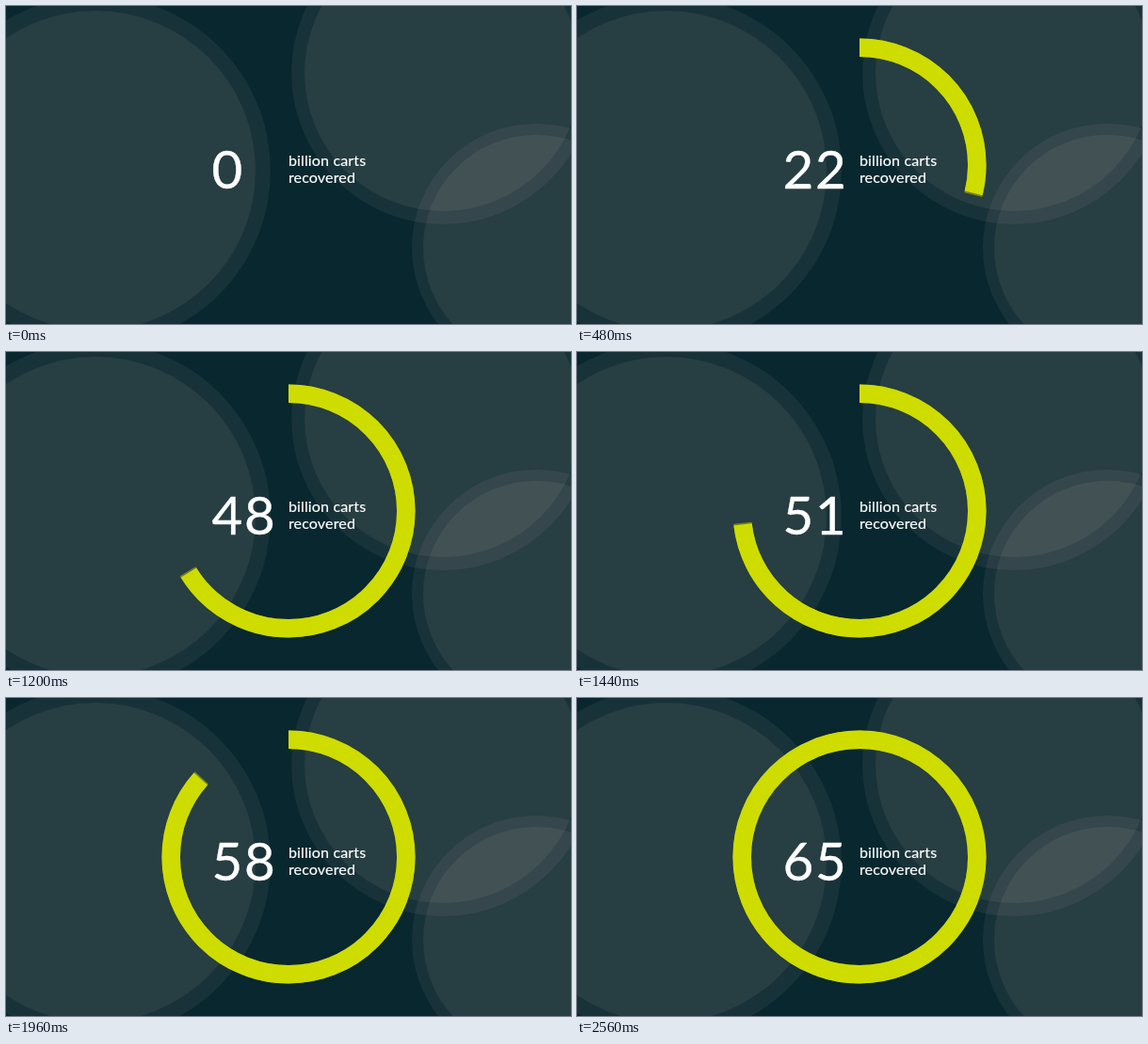
Animation, 600 px wide and 338 px high, one loop 5 s. Source, as an HTML page:

```html
<!DOCTYPE html>
<html lang="en">
<head>
<meta charset="utf-8">
<title>Carts recovered</title>
<style>
  html, body { margin: 0; width: 100%; height: 100%; overflow: hidden; background: #08272e; }
  svg { display: block; width: 100vw; height: 100vh; }
  text { font-family: Lato, "Open Sans", sans-serif; fill: #fff; stroke: #fff; stroke-linejoin: round; }
  .count { font-size: 56.5px; letter-spacing: 1.6px; stroke-width: .4; }
  .label { font-size: 16.1px; letter-spacing: .12px; stroke-width: .2; }
  .disc { fill: #ffdac3; fill-opacity: .065; }
  .halo { fill: #ffcddc; fill-opacity: .062; }
  .arc { fill: none; stroke-width: 19.5; }
</style>
</head>
<body>
<svg viewBox="0 0 600 338" preserveAspectRatio="none">
  <rect width="600" height="338" fill="#08272e"/>
  <g id="discs"></g>
  <g transform="rotate(-90 300 169)">
    <circle id="tip" class="arc" cx="300" cy="169" r="124.8" stroke="#78851b"/>
    <circle id="bar" class="arc" cx="300" cy="169" r="124.8" stroke="#cedc00"/>
  </g>
  <text id="count" class="count" x="218.6" y="193.6">0</text>
  <text class="label" x="299.9" y="169.5">billion carts</text>
  <text class="label" x="299.9" y="187.5">recovered</text>
</svg>
<script>
  const LOOP = 5000, STEP = 40, END = 2560, TIP = 0.8;
  const TURN = 2 * Math.PI * 124.8;

  // [time in ms, value], joined by straight lines
  const ANGLE = [[0, 0], [1000, 218], [1700, 291.2], [END, 361]];
  const COUNT = [[0, 0], [1000, 45], [END, 65]];

  // Background discs: centre, inner radius, outer radius
  const DISCS = [[95, 175, 170, 186], [464, 71, 147, 161], [563, 257, 120, 132]];

  const $ = id => document.getElementById(id);

  $("discs").innerHTML = DISCS.map(([x, y, inner, outer]) =>
    `<circle class="halo" cx="${x}" cy="${y}" r="${outer}"/>` +
    `<circle class="disc" cx="${x}" cy="${y}" r="${inner}"/>`).join("");

  function valueAt(keys, t) {
    const i = Math.max(1, keys.findIndex(k => k[0] >= t));
    const [t0, a] = keys[i - 1], [t1, b] = keys[i];
    return a + (b - a) * (t - t0) / (t1 - t0);
  }

  function setArc(el, degrees) {
    el.style.display = degrees > 0 ? "" : "none";
    el.setAttribute("stroke-dasharray",
      degrees >= 360 ? "none" : `${TURN * degrees / 360} ${TURN}`);
  }

  function draw(time) {
    const t = Math.min(Math.floor((time % LOOP) / STEP) * STEP, END);
    const angle = valueAt(ANGLE, t);
    setArc($("tip"), angle);
    setArc($("bar"), angle - TIP);
    $("count").textContent = Math.ceil(valueAt(COUNT, t));
  }

  const start = performance.now();
  function tick() {
    draw(performance.now() - start);
    requestAnimationFrame(tick);
  }
  tick();
</script>
</body>
</html>
```
